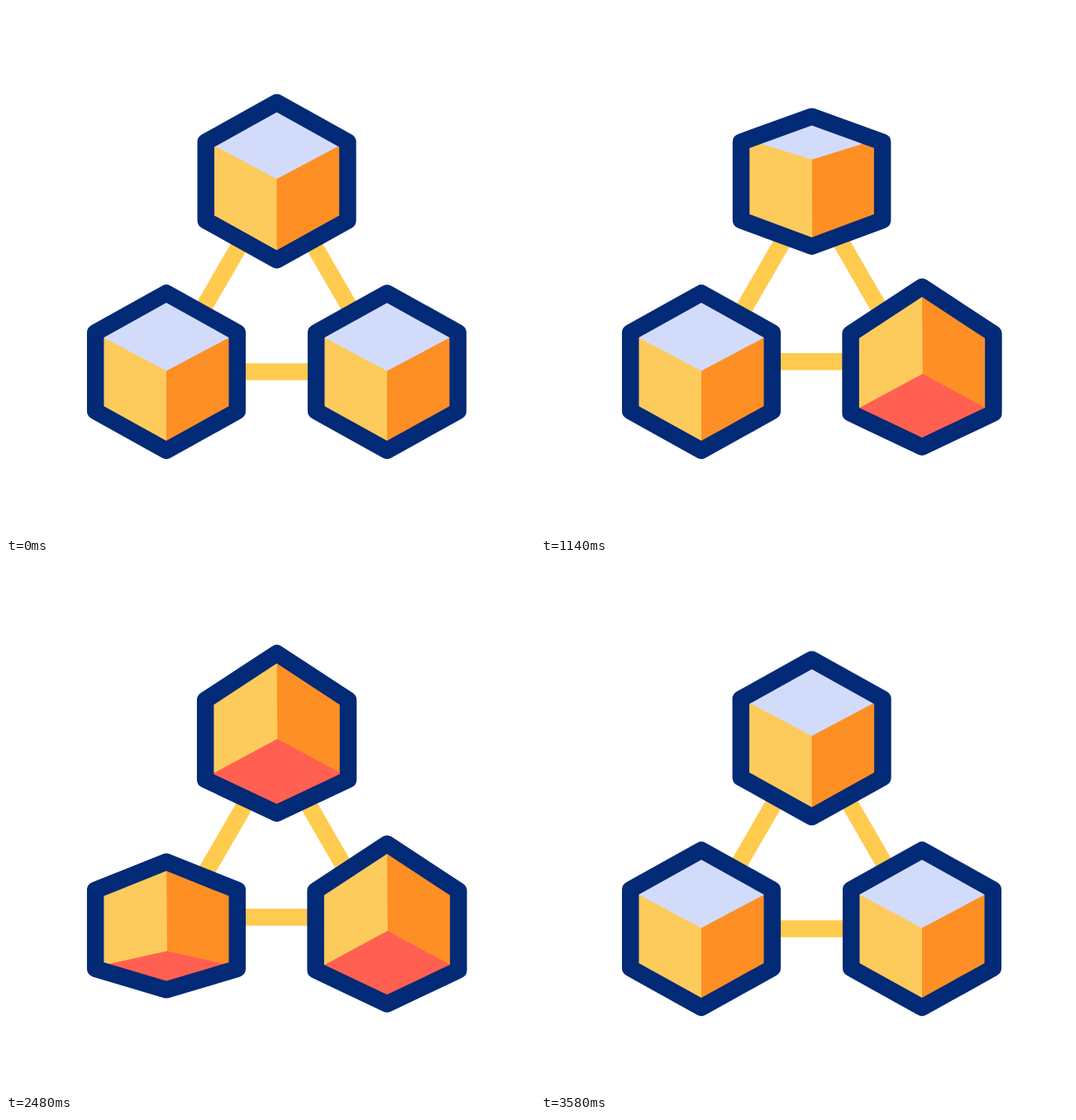
These frames come from a looping animation (640x640 px, 3.6 s). An HTML page:

```html
<!DOCTYPE html>
<html lang="en">
<head>
<meta charset="utf-8">
<title>Linked cubes</title>
<style>
  html, body { margin: 0; width: 100%; height: 100%; overflow: hidden; background: #fff; }
  svg { display: block; width: 100%; height: 100%; }
  .link, .rim { fill: none; stroke-width: 20.5; stroke-linejoin: round; }
  .link { stroke: #ffcb4f; }
  .rim { stroke: #032a76; }
  .left { fill: #fdca5c; }
  .right { fill: #fd8f25; }
  .top { fill: #d2dcfa; }
  .base { fill: #ff6051; }
</style>
</head>
<body>
<svg viewBox="0 0 640 640" id="stage">
  <polygon class="link" id="link"/>
</svg>
<script>
const LOOP = 3600;
const MID = { x: 327.5, y: 327.4 };
const NS = 'http://www.w3.org/2000/svg';
const stage = document.getElementById('stage');
const link = document.getElementById('link');

// Poses: seen from above, edge-on, seen from below.
// halfW, peak, shoulder, hip, foot describe the rim; the rest are the
// heights of the lid and base edges at the seam and at the corners.
const POSES = [
  { halfW: 85.8, peak: -95.2, shoulder: -47.5, hip: 47.5, foot: 95.2,
    lid: -1, lidSide: -41.5, base: 160, baseSide: 160, tilt: 0 },
  { halfW: 85.2, peak: -57.8, shoulder: -47.4, hip: 46.5, foot: 58.7,
    lid: -53, lidSide: -56, base: 53, baseSide: 44, tilt: 1.5 },
  { halfW: 86.4, peak: -102.8, shoulder: -46.1, hip: 50, foot: 90.8,
    lid: -160, lidSide: -160, base: 2.5, baseSide: 43.5, tilt: 1.5 }
];

// shift nudges the inner edges, lift shortens the foot when seen from below.
const cubes = [
  { x: 327.6, y: 212, shift: -1.7, lift: 0, turn: [980, 1800] },
  { x: 194, y: 442.6, shift: 0, lift: 3, turn: [1920, 2700] },
  { x: 461, y: 442.6, shift: 0, lift: 0, turn: [0, 860] }
];
const RETURN = [2960, 3580];
const MOVES = [...cubes.map(c => c.turn), RETURN];

const clamp = v => Math.max(0, Math.min(1, v));
const progress = (t, [from, to]) => clamp((t - from) / (to - from));
const ease = x => x + 0.05 * Math.sin(Math.PI * x);
const wave = x => (1 - Math.cos(Math.PI * x)) / 2;

function add(parent, tag, attrs) {
  const el = document.createElementNS(NS, tag);
  for (const k in attrs) el.setAttribute(k, attrs[k]);
  return parent.appendChild(el);
}

function setPoints(el, pts) {
  el.setAttribute('points', pts.map(p => p.map(v => v.toFixed(2)).join()).join(' '));
}

cubes.forEach((c, i) => {
  const g = add(stage, 'g', { transform: `translate(${c.x} ${c.y})` });
  const clip = add(g, 'clipPath', { id: 'rim' + i });
  c.mask = add(clip, 'polygon', {});
  const faces = add(g, 'g', { 'clip-path': `url(#rim${i})` });
  for (const name of ['left', 'right', 'top', 'base']) {
    c[name] = add(faces, 'polygon', { class: name });
  }
  c.rim = add(g, 'polygon', { class: 'rim' });
});

function poseAt(p) {
  const i = p < 1 ? 0 : 1;
  const a = POSES[i], b = POSES[i + 1], out = {};
  for (const k in a) out[k] = a[k] + (b[k] - a[k]) * (p - i);
  return out;
}

function drawCube(c, p) {
  const s = poseAt(p), w = s.halfW, far = 200, side = 76;
  const foot = s.foot - c.lift * Math.max(0, p - 1);
  const rim = [[0, s.peak], [w, s.shoulder], [w, s.hip],
               [0, foot], [-w, s.hip], [-w, s.shoulder]];
  setPoints(c.mask, rim);
  setPoints(c.rim, rim);

  setPoints(c.left, [[-far, -far], [2, -far], [2, far], [-far, far]]);
  setPoints(c.right, [[0, -100], [far, -100], [far, 100], [s.tilt, 100]]);

  // Face edges run on past the corners and are cut off by the rim.
  const cap = (el, mid, corner, end) => {
    const y = mid + (corner - mid) * far / side;
    const x = s.tilt / 2;
    setPoints(el, [[-far, y + c.shift], [x, mid + c.shift], [far, y + c.shift],
                   [far, end], [-far, end]]);
  };
  cap(c.top, s.lid, s.lidSide, -400);
  cap(c.base, s.base, s.baseSide, 400);
}

function drawLink(t) {
  const peak = 0.43;
  const squeeze = MOVES.reduce((sum, m) => {
    const x = progress(t, m);
    return sum + (x < peak ? wave(x / peak) : 1 - wave((x - peak) / (1 - peak)));
  }, 0);
  const k = 1 - 0.25 * squeeze;
  setPoints(link, cubes.map(c => [MID.x + (c.x - MID.x) * k, MID.y + (c.y - MID.y) * k]));
}

function frame(now) {
  const t = now % LOOP;
  const back = ease(progress(t, RETURN));
  drawLink(t);
  for (const c of cubes) drawCube(c, 2 * clamp(ease(progress(t, c.turn)) - back));
  requestAnimationFrame(frame);
}
frame(0);
</script>
</body>
</html>
```
